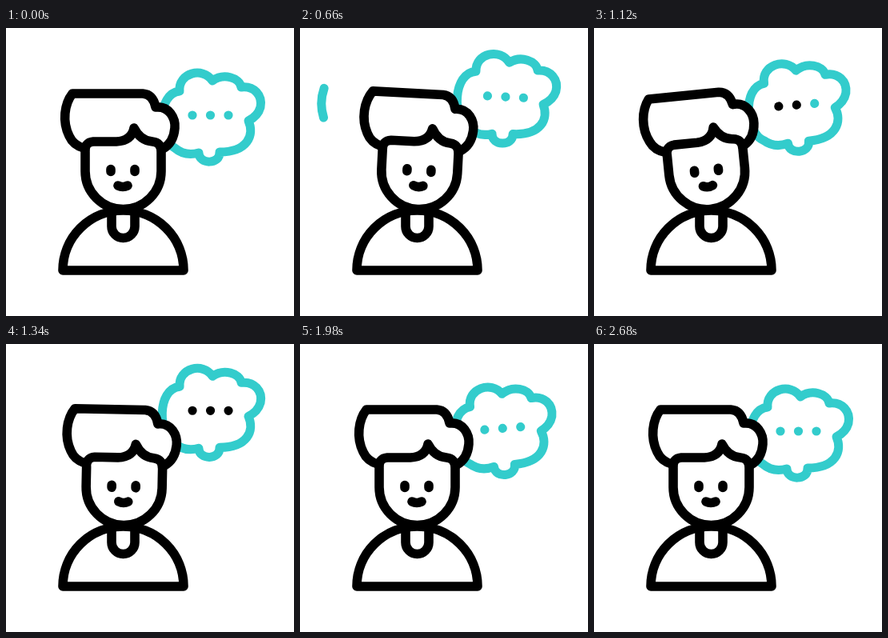
Recreate the animation shown at these times as an HTML page. Size 360 by 360 pixels, loop 2.72 s.

```html
<!DOCTYPE html>
<html lang="en">
<head>
<meta charset="utf-8">
<title>Thinking person</title>
<style>
  html, body { margin: 0; height: 100%; overflow: hidden; background: #fff; }
  svg { display: block; width: 100%; height: 100%; }
  path { stroke-width: 11.6; stroke-linecap: round; stroke-linejoin: round; }
  #bubble path, #swoosh { stroke-width: 11; }
</style>
</head>
<body>
<svg viewBox="0 0 360 360" fill="none" stroke="#000">
  <path id="swoosh" pathLength="1" stroke="#3cc" d="M107 41A58 58 0 0 0 29.5 112"/>
  <g id="bubble" stroke="#3cc">
    <path fill="#fff" d="M211 150C190 140 188 82 217 79C215 56 246 48 258 66C272 56 292 62 294 74
      C310 72 321 84 318 99Q315 110 303 116C311 134 302 155 267 155C268 171 241 171 241 156Q224 161 211 150Z"/>
    <g id="dots" stroke="none">
      <circle cx="233" cy="109" r="5.6"/>
      <circle cx="255.5" cy="109" r="5.6"/>
      <circle cx="278" cy="109" r="5.6"/>
    </g>
  </g>
  <path fill="#fff" d="M71 303A75.5 75 0 0 1 222 303Z"/>
  <path d="M132 231V248a14.5 14.5 0 0 0 29 0V231"/>
  <g id="head">
    <path fill="#fff" d="M97 150C90 148 83 144 79 135C70 117 73 95 83 82H171Q184 83 187 99
      C204 97 212 113 211 125C210 138 205 146 196 151"/>
    <path fill="#fff" d="M99 155Q98 143 109 142H138Q157 141 160 125Q168 141 183 142Q194 143 194 155V179A47.5 47.5 0 0 1 99 179Z"/>
    <path id="eyes"/>
    <path d="M140 197Q146 200 152 197"/>
  </g>
</svg>
<script>
const LOOP = 2720;
const [swoosh, bubble, dots, head, eyes] =
  ['swoosh', 'bubble', 'dots', 'head', 'eyes'].map(id => document.getElementById(id));

// Eased 0 to 1 between two times
function ease(t, from, to) {
  const u = Math.min(1, Math.max(0, (t - from) / (to - from)));
  return u * u * (3 - 2 * u);
}
// Smooth 0 to 1 and back to 0 between two times
function hop(t, from, to) {
  return t > from && t < to ? Math.sin(Math.PI * (t - from) / (to - from)) ** 2 : 0;
}
// Cosine that is 1 at the given time
const wave = (t, crest, period) => Math.cos(2 * Math.PI * (t - crest) / period);

function render(t) {
  const tilt = (-1 - 4.8 * wave(t, 360, 740)) * ease(t, 200, 360) * (1 - ease(t, 1460, 1660));
  head.setAttribute('transform', `rotate(${tilt} 146 233)`);

  const sway = -4.5 * wave(t, 1120, 870) * ease(t, 360, 860) * (1 - ease(t, 1980, 2360));
  const lift = 23 * hop(t, 300, 1040) + 26 * hop(t, 930, 1700)
    + 6 * hop(t, 1800, 2440) + 33 * hop(t, 2240, 2680);
  bubble.setAttribute('transform', `translate(0 ${-lift}) rotate(${sway} 255 137)`);

  const half = 1.5 - 1.3 * hop(t, 1460, 1660);
  eyes.setAttribute('d', [131, 161].map(x => `M${x} ${178 - half}v${2 * half}`).join(''));

  [...dots.children].forEach((dot, i) => {
    const local = t - 200 * i;
    dot.setAttribute('fill', local > 820 && local < 1420 ? '#000' : '#3cc');
  });

  const start = ease(t, 460, 770), length = ease(t, 220, 480) - start;
  swoosh.style.display = length > 0.001 ? '' : 'none';
  swoosh.setAttribute('stroke-dasharray', `${length} 2`);
  swoosh.setAttribute('stroke-dashoffset', -start);
}

const begin = performance.now();
function tick() {
  render((performance.now() - begin) % LOOP);
  requestAnimationFrame(tick);
}
tick();
</script>
</body>
</html>
```
